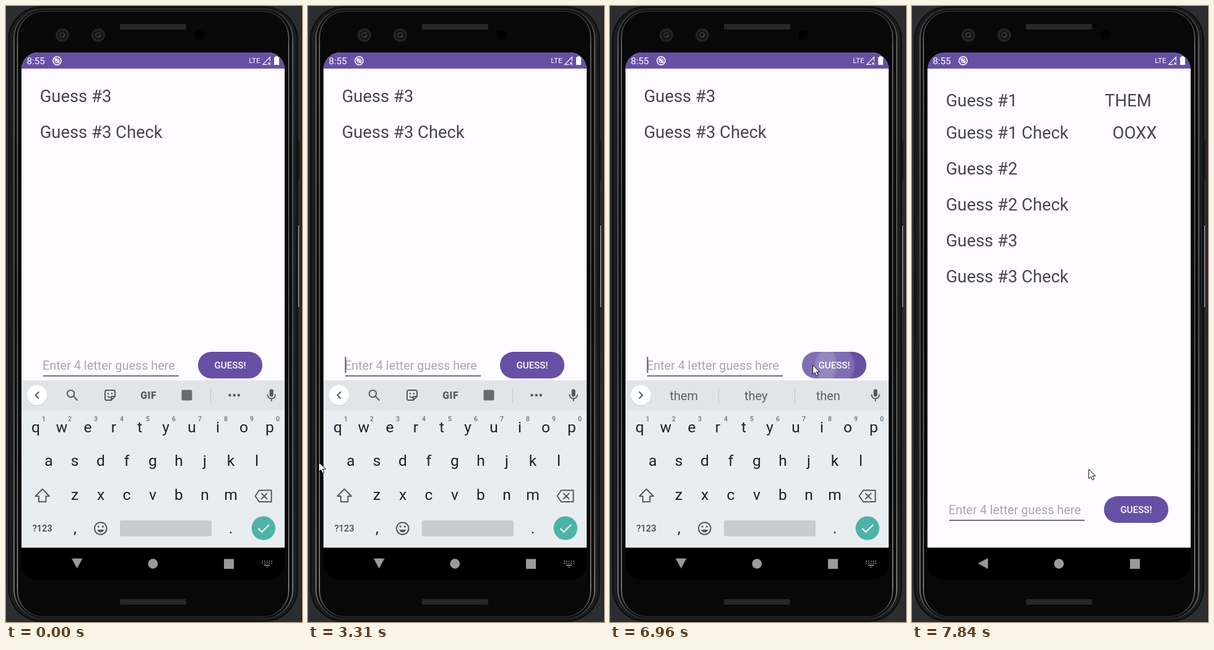
An HTML page for the animation above (7.99 s loop, 478 by 994 pixels).

```html
<!DOCTYPE html>
<html lang="en">
<head>
<meta charset="utf-8">
<title>Word guess</title>
<style>
html, body { margin: 0; width: 100%; height: 100%; overflow: hidden; background: #2b2d30; }
svg { display: block; width: 478px; height: 994px; font-family: Roboto, "Noto Sans", sans-serif; }
.mid { text-anchor: middle; }
.row { font-size: 27.4px; fill: #49454f; }
.field { font-size: 19.85px; }
.sugg { font-size: 20px; fill: #5a6166; }
.line { fill: none; stroke: #535b60; stroke-width: 2; stroke-linejoin: round; stroke-linecap: round; }

/* Every change is a hard step on one 7.99 s clock */
#content, #keys, #caret, #caretx, #hint, #pointer, #back, #fade, #ripple, #ime,
.tools, .typing, #two, #three, #four, #s2, #s3, #s4 {
  animation: 7.99s step-end infinite;
}
#content { animation-name: content; }
#keys { animation-name: keys; }
#caret { animation-name: caret; }
#caretx { animation-name: caretx; }
#hint { animation-name: hint; }
.tools { animation-name: tools; }
.typing { animation-name: typing; }
#two { animation-name: two; }
#three { animation-name: three; }
#four { animation-name: four; }
#s2 { animation-name: s2; }
#s3 { animation-name: s3; }
#s4 { animation-name: s4; }
#pointer { animation-name: pointer; }
#back { animation-name: back; }
#fade { animation-name: fade; }
#ripple { animation-name: ripple; }
#ime { animation-name: ime; }

@keyframes content {
  0% { transform: translateY(-233px); }
  88.61% { transform: translateY(-230px); }
  90.237% { transform: translateY(-20px); }
  91.989% { transform: translateY(-3px); }
  93.491%, 100% { transform: none; }
}
@keyframes keys {
  0% { transform: none; opacity: 1; }
  88.61% { transform: translateY(18px); opacity: .73; }
  90.237%, 100% { transform: translateY(18px); opacity: 0; }
}
@keyframes caret {
  0%, 10.763%, 22.528%, 36.42%, 48.31%, 78.973%, 93.491%, 100% { opacity: 0; }
  5.381%, 17.396%, 29.787%, 41.426%, 54.693%, 62.077%, 87.108% { opacity: 1; }
}
@keyframes caretx {
  0%, 87.108%, 100% { transform: none; }
  62.077% { transform: translateX(17.3px); }
  69.086% { transform: translateX(27.8px); }
  72.34% { transform: translateX(45.2px); }
}
@keyframes hint { 0%, 87.108%, 100% { opacity: 1; } 62.077% { opacity: 0; } }
@keyframes tools { 0% { opacity: 1; } 62.077%, 100% { opacity: 0; } }
@keyframes typing { 0% { opacity: 0; } 62.077%, 100% { opacity: 1; } }
@keyframes two { 0%, 87.108%, 100% { opacity: 0; } 62.077% { opacity: 1; } }
@keyframes three { 0%, 87.108%, 100% { opacity: 0; } 69.086% { opacity: 1; } }
@keyframes four { 0%, 87.108%, 100% { opacity: 0; } 72.34% { opacity: 1; } }
@keyframes s2 { 0%, 70.588%, 100% { opacity: 0; } 62.077% { opacity: 1; } }
@keyframes s3 { 0%, 72.34%, 100% { opacity: 0; } 70.588% { opacity: 1; } }
@keyframes s4 { 0% { opacity: 0; } 72.34%, 100% { opacity: 1; } }
@keyframes pointer {
  0% { transform: translate(-40px, 741px); }
  22.528% { transform: translate(12px, 741px); }
  24.405% { transform: translate(17px, 736px); }
  45.306% { transform: translate(24px, 722px); }
  46.808% { transform: translate(45px, 686px); }
  48.31% { transform: translate(72px, 640px); }
  49.812% { transform: translate(92px, 604px); }
  51.314% { transform: translate(106px, 579px); }
  52.816% { transform: translate(111px, 570px); }
  78.973% { transform: translate(150px, 572px); }
  80.475% { transform: translate(230px, 576px); }
  81.977% { transform: translate(300px, 579px); }
  83.479% { transform: translate(327px, 579px); }
  96.62% { transform: translate(306px, 665px); }
  98.122%, 100% { transform: translate(285px, 747px); }
}
@keyframes back {
  0% { transform: none; }
  88.61% { transform: rotate(12deg); }
  90.237% { transform: rotate(83deg); }
  91.989% { transform: rotate(88deg); }
  93.491%, 100% { transform: rotate(90deg); }
}
@keyframes ripple { 0%, 88.61%, 100% { opacity: 0; } 87.108% { opacity: 1; } }
@keyframes fade {
  0%, 93.491%, 100% { opacity: 0; }
  88.61% { opacity: .3; }
  90.237% { opacity: .24; }
  91.989% { opacity: .1; }
}
@keyframes ime { 0% { opacity: 1; } 88.61%, 100% { opacity: 0; } }
</style>
</head>
<body>
<svg viewBox="0 0 478 994" xmlns="http://www.w3.org/2000/svg">
  <defs>
    <pattern id="mesh" width="2" height="2" patternUnits="userSpaceOnUse">
      <rect width="2" height="2" fill="#121212"/>
      <path d="M0 0H1V1H2V2H1V1H0Z" fill="#3c3c3c"/>
    </pattern>
    <linearGradient id="rim" x1="0" y1="0" x2="0" y2="1">
      <stop offset="0" stop-color="#2c2c2c"/>
      <stop offset=".06" stop-color="#8a8a8a"/>
      <stop offset=".5" stop-color="#6c6c6c"/>
      <stop offset=".95" stop-color="#a5a5a5"/>
      <stop offset="1" stop-color="#2c2c2c"/>
    </linearGradient>
    <radialGradient id="wave">
      <stop offset=".85" stop-color="#fff" stop-opacity=".17"/>
      <stop offset="1" stop-color="#fff" stop-opacity=".08"/>
    </radialGradient>
    <clipPath id="screen"><rect x="25" y="75" width="425" height="851" rx="27"/></clipPath>
    <clipPath id="pill"><rect x="310" y="791" width="104" height="43" rx="21.5"/></clipPath>
  </defs>

  <!-- phone body -->
  <rect width="478" height="994" fill="#2b2d30"/>
  <rect x="470" y="215" width="4" height="66" rx="2" fill="#1a1b1c"/>
  <rect x="470" y="352" width="4" height="136" rx="2" fill="#151515"/>
  <path d="M472.5 354V486" stroke="#b0b0b0" stroke-width="1.6"/>
  <path d="M477.3 0V994" stroke="#1d1e20" stroke-width="1"/>
  <rect x="4.5" y="1.5" width="466" height="991" rx="53" fill="#1c1d1e" stroke="#0b0b0c" stroke-width="2"/>
  <rect x="13" y="5.5" width="450" height="983" rx="47" fill="#0c0c0c" stroke="url(#rim)" stroke-width="1.3"/>
  <rect x="18.5" y="8.5" width="438" height="977" rx="42" fill="#080808" stroke="url(#rim)" stroke-width="1.3"/>
  <rect x="184" y="29" width="107" height="9" rx="2" fill="url(#mesh)"/>
  <rect x="184" y="957" width="107" height="9" rx="2" fill="url(#mesh)"/>
  <g id="lenses"></g>
  <circle cx="312" cy="47" r="8" fill="#000"/>

  <g clip-path="url(#screen)">
    <rect x="25" y="75" width="425" height="851" fill="#000"/>

    <!-- app, laid out at its resting place -->
    <g id="content">
      <rect x="25" y="101" width="425" height="773" fill="#fefbfe"/>
      <g id="rows" class="row">
        <text x="311.3" y="161.8">THEM</text>
        <text x="323.8" y="213.8">OOXX</text>
      </g>
      <text id="hint" class="field" x="58.9" y="820" fill="#aaa6aa">Enter 4 letter guess here</text>
      <g class="field" fill="#1c1b1f">
        <text id="two" x="58.9" y="820">th</text>
        <text id="three" x="76.3" y="820">e</text>
        <text id="four" x="86.8" y="820">m</text>
      </g>
      <path d="M60 829.8H279" stroke="#625b71" stroke-width="1.8"/>
      <g id="caretx"><rect id="caret" x="59.6" y="799" width="2" height="26" fill="#625b71"/></g>
      <g clip-path="url(#pill)">
        <rect x="310" y="791" width="104" height="43" fill="#6750a4"/>
        <rect id="fade" x="310" y="791" width="104" height="43" fill="#fff"/>
        <g id="ripple" fill="url(#wave)">
          <circle cx="327" cy="813" r="40"/>
          <circle cx="363" cy="813" r="33"/>
        </g>
      </g>
      <text class="mid" x="362" y="818.4" font-size="15.15" font-weight="500" fill="#fff">GUESS!</text>
    </g>

    <!-- status bar -->
    <rect x="25" y="75" width="425" height="26" fill="#6750a4"/>
    <g fill="#fff">
      <text x="33.5" y="94" font-size="15.2">8:55</text>
      <text x="392.3" y="92.3" font-size="11.8">LTE</text>
      <path d="M435.2 82.5V81H438.8V82.5H441V95H433V82.5Z"/>
    </g>
    <g fill="none" stroke="#fff">
      <circle cx="82.5" cy="88.3" r="6.6" stroke-width="1.6"/>
      <path d="M79 85L86 91.6" stroke-width="2.6"/>
      <circle cx="82.5" cy="88.3" r="3.2" stroke-width="1.2"/>
      <path d="M421.5 94.3H414.8L426.2 82.6V89M423.2 90.8L427 94.6M427 90.8L423.2 94.6" stroke-width="1.2"/>
    </g>

    <!-- navigation bar -->
    <g fill="#999b9b">
      <g transform="translate(114.7 899.5)"><path id="back" d="M-8.8-8H8.8L0 8.3Z"/></g>
      <circle cx="237.3" cy="900" r="7.9"/>
      <rect x="352" y="892.3" width="16" height="16"/>
      <g id="ime" fill="none" stroke="#999b9b" stroke-width="1.6">
        <path d="M413 896H430M413 899.3H430" stroke-dasharray="1.9 1.87"/>
        <path d="M416.5 902.5H426.5"/>
        <path d="M419.8 904.8H423.2L421.5 906.5Z" fill="#999b9b" stroke="none"/>
      </g>
    </g>

    <!-- keyboard -->
    <g id="keys">
      <rect x="25" y="604" width="425" height="270" fill="#e9edf0"/>
      <rect x="25" y="604" width="425" height="48.5" fill="#e1e5e8"/>
      <circle cx="50" cy="628.8" r="16.6" fill="#c9cdd0"/>
      <circle cx="50" cy="628" r="16.3" fill="#fff"/>
      <path class="line tools" d="M52.5 623L47.5 628L52.5 633"/>
      <path class="line typing" d="M47.5 623L52.5 628L47.5 633"/>

      <g class="tools">
        <g class="line">
          <circle cx="104.6" cy="625.6" r="5.7"/>
          <path d="M109 630L115 636"/>
          <path d="M162.5 620H173.5Q176 620 176 622.5V630L170 636H162.5Q160 636 160 633.5V622.5Q160 620 162.5 620ZM170 636V632Q170 630 172 630H176"/>
          <path d="M164.5 630Q166.5 632.6 169 631"/>
        </g>
        <g fill="#535b60">
          <circle cx="165" cy="625.5" r="1.3"/>
          <circle cx="171" cy="625.5" r="1.3"/>
          <text class="mid" x="230.2" y="633.5" font-size="15.8" font-weight="900" letter-spacing=".5">GIF</text>
          <rect x="283.5" y="619.5" width="17" height="17" rx="2" fill="#656c71"/>
          <circle cx="361.5" cy="628" r="2.2"/>
          <circle cx="368.7" cy="628" r="2.2"/>
          <circle cx="375.8" cy="628" r="2.2"/>
        </g>
        <path d="M330.5 616V640" stroke="#c6cacd"/>
      </g>

      <g class="typing">
        <path d="M175.5 615V641M298.5 615V641" stroke="#c6cacd"/>
        <g id="s2" class="sugg mid"></g>
        <g id="s3" class="sugg mid"></g>
        <g id="s4" class="sugg mid"></g>
      </g>

      <rect x="425.6" y="618.3" width="6.2" height="12" rx="3.1" fill="#535b60"/>
      <path class="line" d="M422.5 627.5C422.5 635.5 434.8 635.5 434.8 627.5M428.7 634V637"/>

      <g id="letters" class="mid" font-size="24.6" fill="#172329"></g>
      <g id="digits" class="mid" font-size="10.5" font-weight="500" fill="#6a7176"></g>
      <path class="line" d="M58.8 779.5L70 791H64.5V800H53V791H47.5Z"/>
      <path class="line" d="M409 781.5H428.5V800H409L402.5 790.8ZM412.8 786.6L421.4 795.2M421.4 786.6L412.8 795.2"/>
      <text class="mid" x="58.7" y="848" font-size="14.6" font-weight="500" fill="#3d474d">?123</text>
      <circle class="line" cx="152.8" cy="843" r="9.8"/>
      <g fill="#535b60">
        <path d="M147.2 845H158.4Q156.6 849.4 152.8 849.4T147.2 845Z"/>
        <circle cx="149.2" cy="840" r="1.6"/>
        <circle cx="156.4" cy="840" r="1.6"/>
      </g>
      <rect x="184" y="830" width="148" height="25.5" rx="3" fill="#c8ccd0"/>
      <circle cx="415.8" cy="842.6" r="19.2" fill="#4db3a8"/>
      <path d="M407.4 843L413.2 848.8L425 837" fill="none" stroke="#fff" stroke-width="2"/>
    </g>
  </g>

  <path id="pointer" d="M.5.5V15.6L4 12.3L6.4 17.8L9 16.7L6.6 11.3H11.4Z" fill="#fff" stroke="#111"/>
</svg>

<script>
const NS = 'http://www.w3.org/2000/svg';
const byId = id => document.getElementById(id);

function add(parent, tag, attrs, text = '') {
  const el = document.createElementNS(NS, tag);
  for (const name in attrs) el.setAttribute(name, attrs[name]);
  el.textContent = text;
  parent.append(el);
}

const label = (id, x, y, text) => add(byId(id), 'text', { x, y }, text);

function keyRow(chars, x, y, id = 'letters') {
  [...chars].forEach((c, i) => label(id, x + i * 42, y, c));
}

[162, 214, 272, 330, 388, 446].forEach((y, i) => {
  label('rows', 54.7, y - .2, `Guess #${(i >> 1) + 1}${i % 2 ? ' Check' : ''}`);
});

keyRow('qwertyuiop', 48, 688);
keyRow('asdfghjkl', 69, 742);
keyRow('zxcvbnm', 111, 797);
keyRow('1234567890', 61, 670.3, 'digits');
label('letters', 111.3, 850.5, ',');
label('letters', 363, 850.5, '.');

const hints = { s2: 'the that thank', s3: 'the then they', s4: 'them they then' };
for (const id in hints) {
  hints[id].split(' ').forEach((word, i) => label(id, 119.3 + i * 116.5, 635.5, word));
}

for (const cx of [91, 149]) {
  [[11, '#222426'], [7.5, '#101214'], [5, '#2b3035'], [2.5, '#0d0f11']].forEach(([r, fill]) => {
    add(byId('lenses'), 'circle', { cx, cy: 47, r, fill });
  });
  add(byId('lenses'), 'circle', { cx: cx + 2, cy: 49, r: 1, fill: '#6a7076' });
}
</script>
</body>
</html>
```
